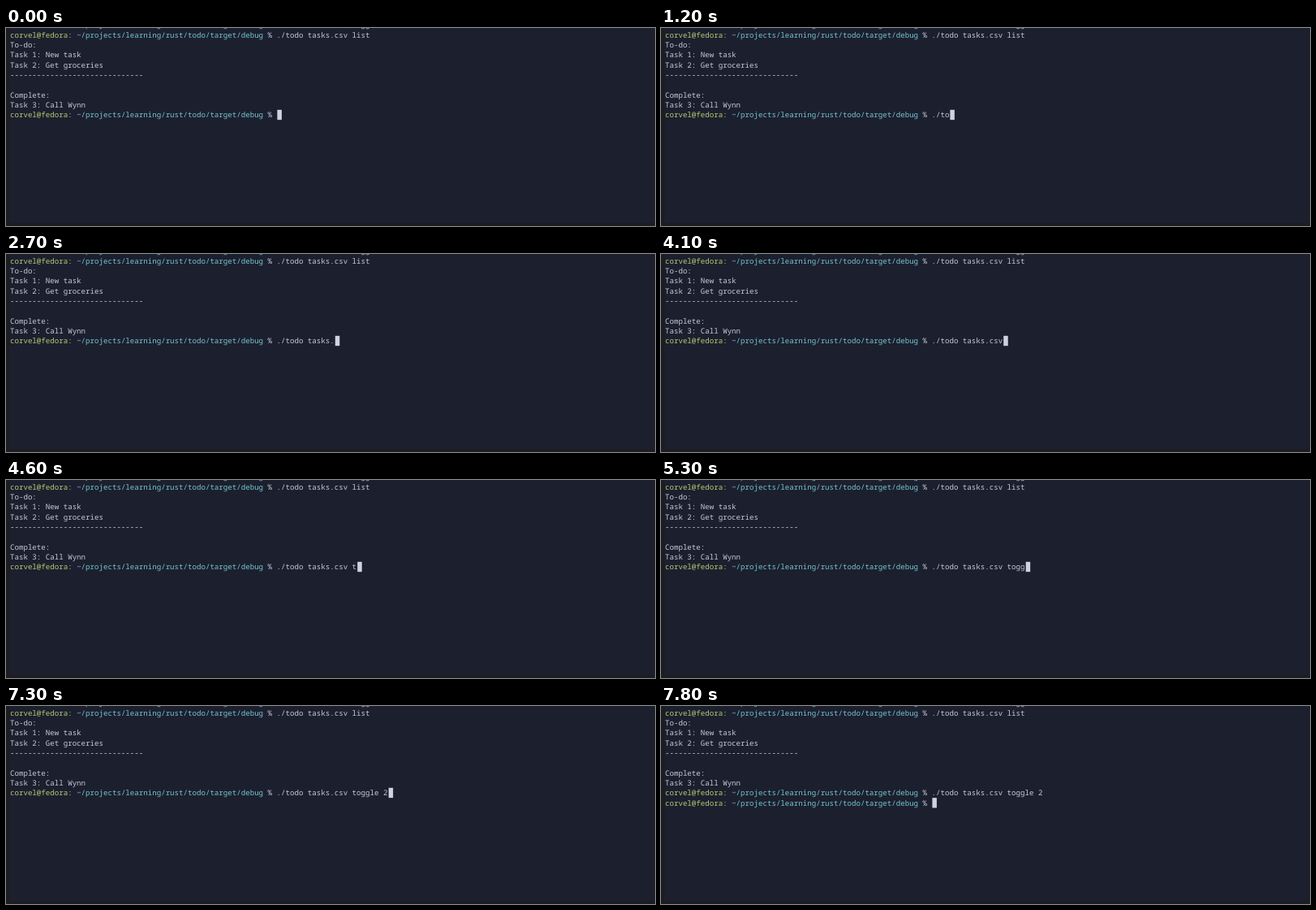
An HTML page for the animation above (8000 ms loop, 800 px wide and 244 px high).

```html
<!DOCTYPE html>
<html lang="en">
<head>
<meta charset="utf-8">
<title>Terminal</title>
<style>
  html, body { margin: 0; height: 100%; overflow: hidden; background: #1c1d21; }
  svg { display: block; width: 800px; height: 244px; }
  text {
    font: 9.15px "Noto Sans Mono", monospace;
    text-rendering: geometricPrecision;
    white-space: pre;
    fill: #c3c9d9;
  }
  .user { fill: #b9c873; }
  .path { fill: #75c5d1; }
</style>
</head>
<body>
<svg id="screen" viewBox="0 0 800 244">
  <rect x="4.5" width="794.5" height="240.5" fill="#1c1f2e"/>
</svg>
<script>
const LOOP = 8000, LEFT = 5, TOP = 2.2, CELL = 5.49, ROW = 12.33, BASELINE = 9.5;
const USER = "corvel@fedora:", PATH = " ~/projects/learning/rust/todo/target/debug", SIGN = " % ";
const PROMPT_LENGTH = (USER + PATH + SIGN).length;
const ENTER = 7800;
const BLINK_DELAY = 600;
const KEY_BEFORE_START = -400;

// Each burst is typed at a steady pace
const keys = [
  { text: "./todo ", start: 700, step: 165 },
  { text: "tasks", start: 2100, step: 100 },
  { text: ".", start: 2700, step: 0 },
  { text: "cs", start: 3500, step: 100 },
  { text: "v ", start: 4100, step: 200 },
  { text: "toggle", start: 4600, step: 190 },
  { text: " 2", start: 6100, step: 700 }
].flatMap(({ text, start, step }) =>
  [...text].map((char, i) => ({ char, time: start + i * step })));

const screen = document.getElementById("screen");

function add(parent, tag, attributes, content = "") {
  const node = document.createElementNS("http://www.w3.org/2000/svg", tag);
  for (const name in attributes) node.setAttribute(name, attributes[name]);
  node.textContent = content;
  return parent.appendChild(node);
}

function line(row, content = "") {
  return add(screen, "text", { x: LEFT, y: TOP + row * ROW + BASELINE }, content);
}

// Returns the part of the line that holds the command
function prompt(row, command = "") {
  const text = line(row);
  add(text, "tspan", { class: "user" }, USER);
  add(text, "tspan", { class: "path" }, PATH);
  add(text, "tspan", {}, SIGN);
  return add(text, "tspan", {}, command);
}

// Scrolled out, only its descenders remain in view
prompt(-1, "./todo tasks.csv toggle 3");
prompt(0, "./todo tasks.csv list");
["To-do:", "Task 1: New task", "Task 2: Get groceries", "-".repeat(30), "", "Complete:", "Task 3: Call Wynn"]
  .forEach((content, i) => line(i + 1, content));
const command = prompt(8);
const nextPrompt = prompt(9).parentNode;
const cursor = add(screen, "rect", { width: CELL, height: ROW, fill: "#cfd3de" });

function setVisible(node, visible) {
  node.setAttribute("visibility", visible ? "visible" : "hidden");
}

function draw(now) {
  const time = now % LOOP;
  const typed = keys.filter(key => key.time <= time);
  const entered = time >= ENTER;
  const lastKey = entered ? ENTER : typed.at(-1)?.time ?? KEY_BEFORE_START;

  command.textContent = typed.map(key => key.char).join("");
  setVisible(nextPrompt, entered);
  setVisible(cursor, time - lastKey < BLINK_DELAY);
  cursor.setAttribute("x", LEFT + CELL * (PROMPT_LENGTH + (entered ? 0 : typed.length)));
  cursor.setAttribute("y", TOP + ROW * (entered ? 9 : 8));
}

const begin = performance.now();
function tick() {
  draw(performance.now() - begin);
  requestAnimationFrame(tick);
}
tick();
</script>
</body>
</html>
```
